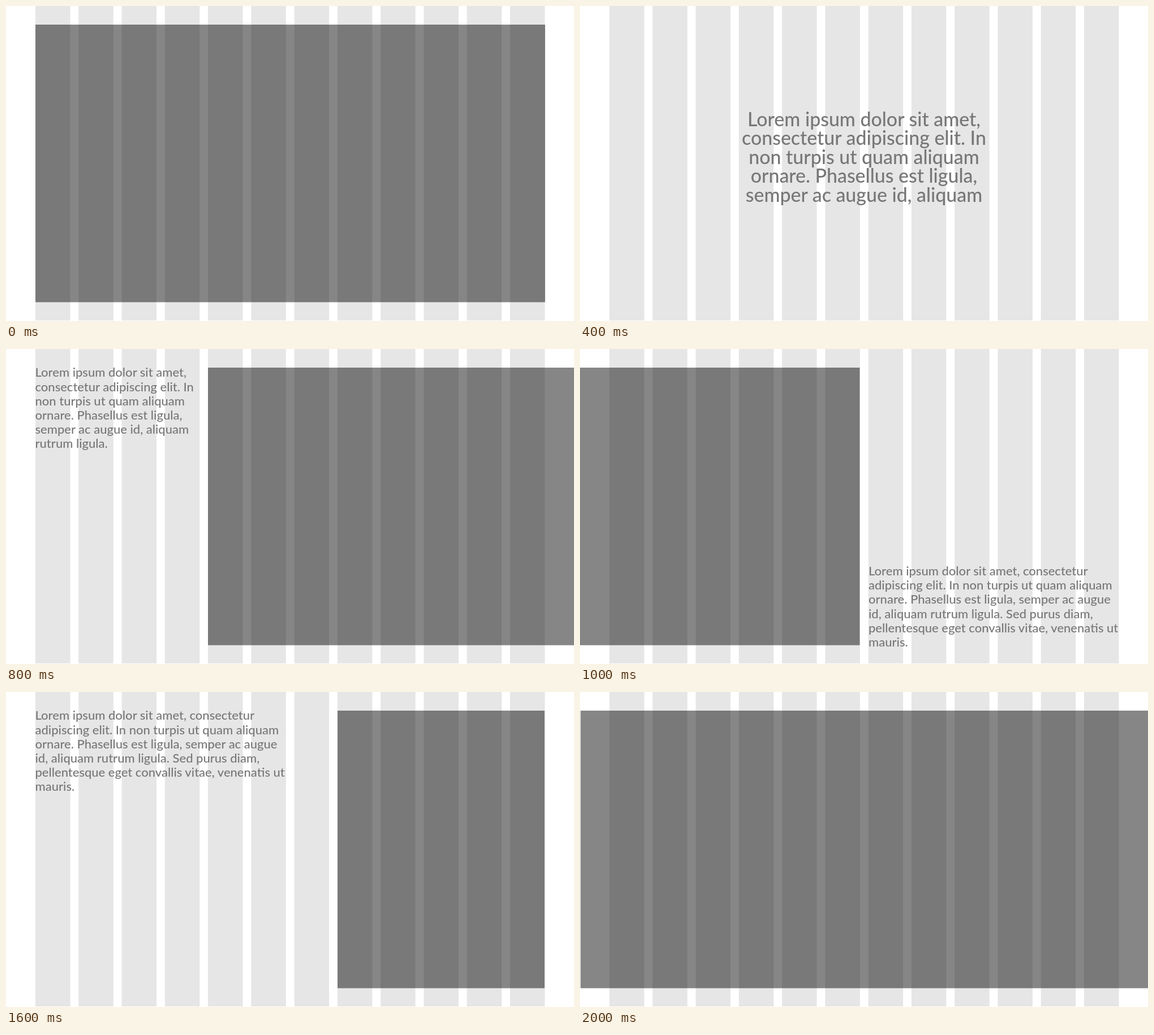
Write an HTML page that moves like this. It is 1004 px wide and 558 px high and loops after 2200 ms.

```html
<!DOCTYPE html>
<html lang="la">
<head>
<meta charset="utf-8">
<title>Column grid layouts</title>
<style>
  html, body { margin: 0; width: 100%; height: 100%; overflow: hidden; background: #fff; }
  svg { display: block; }
  text { font: 500 22px Lato, sans-serif; fill: #777; }
  .large { font-size: 33.9px; text-anchor: middle; }
</style>
</head>
<body>
<svg id="stage" width="1004" height="558" viewBox="0 0 1004 558">
  <g id="columns" fill="#e6e6e6"></g>
  <g id="layout"></g>
</svg>
<script>
const SLIDE_MS = 200;

const narrow = [
  'Lorem ipsum dolor sit amet,',
  'consectetur adipiscing elit. In',
  'non turpis ut quam aliquam',
  'ornare. Phasellus est ligula,',
  'semper ac augue id, aliquam',
  'rutrum ligula.'
];
const wide = [
  'Lorem ipsum dolor sit amet, consectetur',
  'adipiscing elit. In non turpis ut quam aliquam',
  'ornare. Phasellus est ligula, semper ac augue',
  'id, aliquam rutrum ligula. Sed purus diam,',
  'pellentesque eget convallis vitae, venenatis ut',
  'mauris.'
];

const rect = (left, right, top = 33, bottom = 525, attrs = '') =>
  `<rect x="${left}" y="${top}" width="${right - left}" height="${bottom - top}" ${attrs}/>`;

// Picture area: translucent, so the columns show through.
const block = (left, right) => rect(left, right, 33, 524.7, 'fill-opacity=".474"');

const paragraph = (lines, x, baseline, leading = 25.2, style = '') =>
  lines.map((line, i) =>
    `<text class="${style}" x="${x}" y="${baseline + i * leading}">${line}</text>`).join('');

const slides = [
  block(52, 953),
  block(0, 494.5) + paragraph(wide, 510, 47.3),
  paragraph(narrow.slice(0, 5), 502, 213, 33.4, 'large'),
  block(586, 1004) + paragraph(wide, 51.5, 49.3),
  block(357, 1004) + paragraph(narrow, 51.5, 49.3),
  block(0, 494.5) + paragraph(wide, 510, 401),
  block(357, 953) + paragraph(narrow, 51.5, 49.3),
  block(128.3, 876.7),
  block(586, 952) + paragraph(wide, 51.5, 49.3),
  block(52.7, 419) + paragraph(wide, 508.3, 397),
  block(1, 1004)
];

document.getElementById('columns').innerHTML = Array.from({ length: 12 }, (_, i) => {
  const left = 52 + i * 76.27;
  return rect(left, left + 61.5, 0, 557);
}).join('');

const layout = document.getElementById('layout');
const start = performance.now();
let shown = -1;

function draw() {
  const elapsed = Math.max(0, performance.now() - start);
  const index = Math.floor(elapsed / SLIDE_MS) % slides.length;
  if (index !== shown) {
    layout.innerHTML = slides[index];
    shown = index;
  }
  requestAnimationFrame(draw);
}
draw();
</script>
</body>
</html>
```
